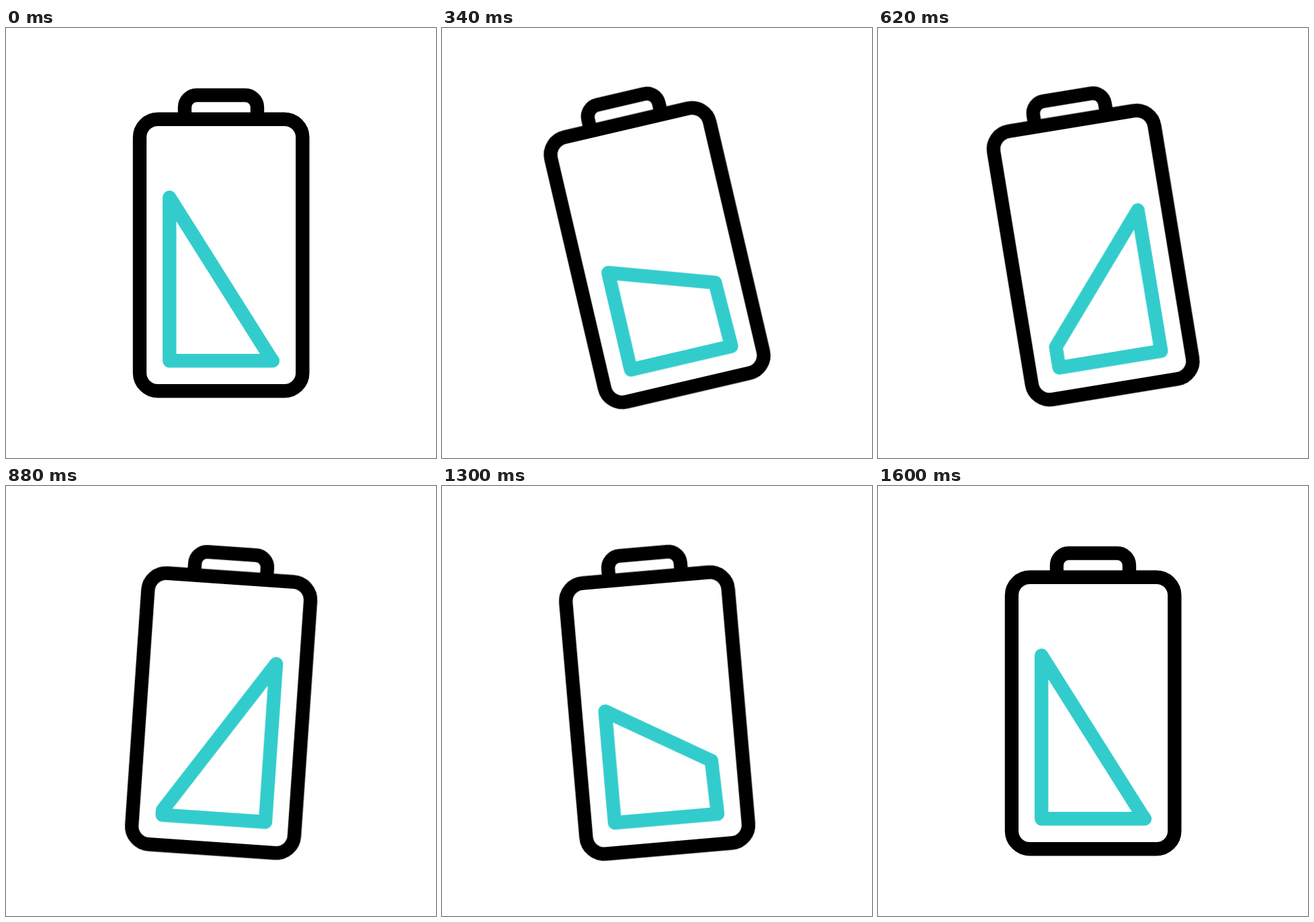
These frames come from a looping animation (640x640 px, 1620 ms). An HTML page without scripts:

```html
<!DOCTYPE html>
<html lang="en">
<head>
<meta charset="utf-8">
<title>Rocking battery</title>
<style>
  html, body {
    margin: 0;
    width: 100%;
    height: 100%;
    overflow: hidden;
    background: #fff;
  }

  svg {
    display: block;
    width: 100%;
    height: 100%;
    fill: none;
    stroke: #000;
    stroke-width: 20.4;
    stroke-linejoin: round;
  }

  .battery {
    --ease: cubic-bezier(.333, 0, .667, 1);
    transform-origin: 320.2px 338px;
    animation: rock 1620ms var(--ease) infinite;
  }

  .charge {
    stroke: #33cccc;
    animation: slosh 1620ms var(--ease) infinite;
  }

  @keyframes rock {
    0% { transform: rotate(0deg); animation-timing-function: cubic-bezier(.6, 0, .7, 1); }
    30.25% { transform: rotate(-20deg); }
    48.15% { transform: rotate(5deg); }
    79.01% { transform: rotate(-5deg); }
    98.77%, 100% { transform: rotate(0deg); }
  }

  /* Only the two upper corners travel; the base stays put. */
  @keyframes slosh {
    0%, 98.77%, 100% { d: path("M243.3 495.3L243.3 252.3L393.5 490.5L397 495.3Z"); }
    49.38% { d: path("M243.3 495.3L243.3 495L397 252.3L397 495.3Z"); }
  }
</style>
</head>
<body>
<svg viewBox="0 0 640 640">
  <g class="battery">
    <path d="M266 135.7V118a18 18 0 0 1 18-18h72a18 18 0 0 1 18 18v17.7"/>
    <rect x="199" y="135.7" width="242.4" height="404.6" rx="27"/>
    <path class="charge" d="M243.3 495.3L243.3 252.3L393.5 490.5L397 495.3Z"/>
  </g>
</svg>
</body>
</html>
```
